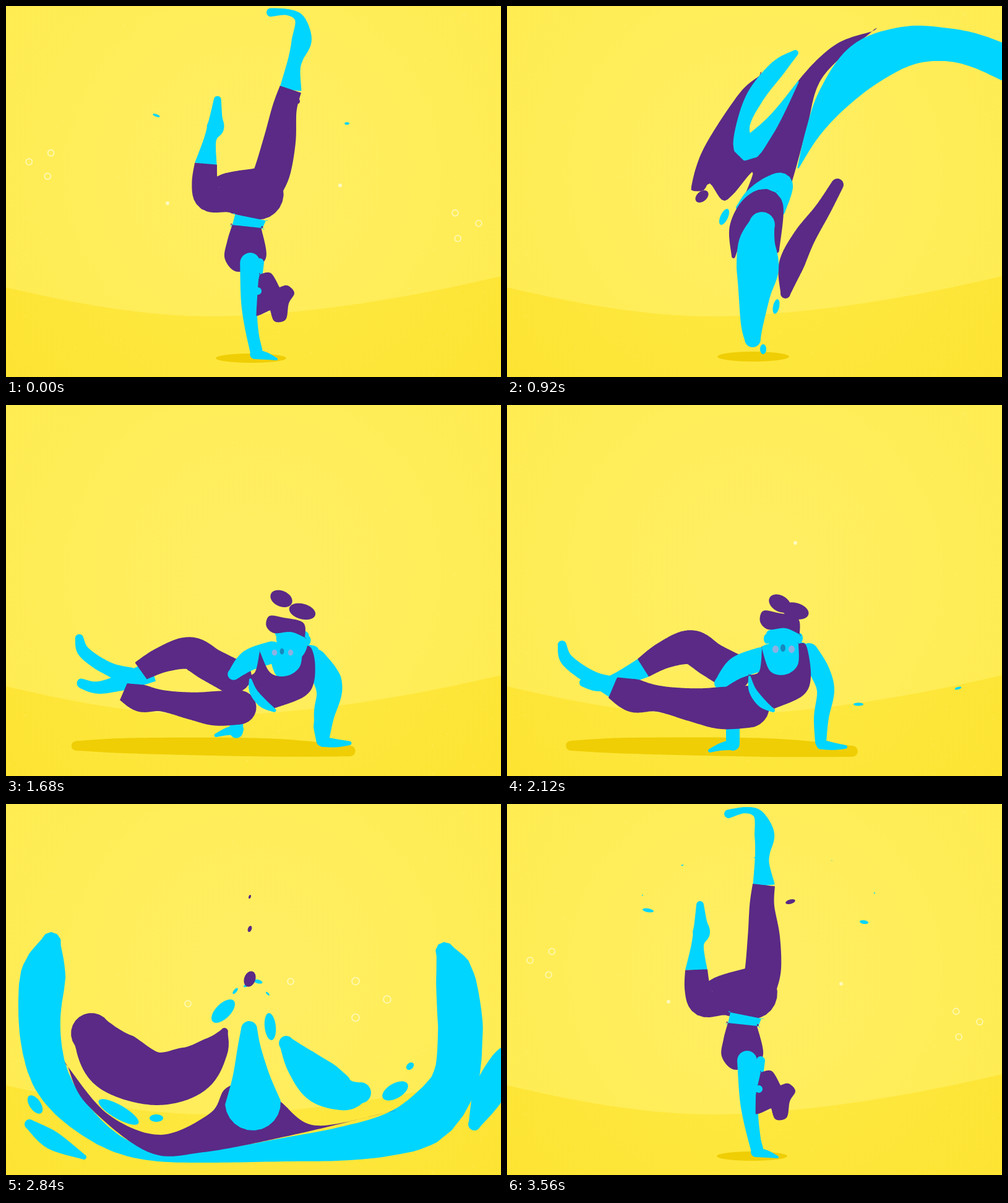
An HTML page with a canvas for the animation above (3.6 s loop, 800 by 600 pixels).

```html
<!DOCTYPE html>
<html lang="en">
<head>
<meta charset="utf-8">
<title>Liquid yoga</title>
<style>
html, body { margin: 0; width: 100%; height: 100%; overflow: hidden; background: #ffec58; }
canvas { display: block; }
</style>
</head>
<body>
<canvas id="stage" width="800" height="600"></canvas>
<script>
const ctx = document.getElementById('stage').getContext('2d');
const LOOP = 3600, STEP = 40, SAMPLES = 240, SPINE = 48;
const CYAN = '#00d5ff', PURPLE = '#5a2a86', WHITE = '#fffdf5', SHADOW = '#efce05', INK = '#32206c', BLUSH = '#8db0e2';
const lerp = (a, b, u) => a + (b - a) * u;
const mix = (p, q, u) => p.map((v, k) => lerp(v, q[k], u));
const rad = deg => deg * Math.PI / 180;
let seed = 7;
const random = () => (seed = seed * 16807 % 2147483647) / 2147483647;

// ---- geometry ----
// "!" after a point makes a corner
const parse = text => text.split(' ').flatMap(word => {
  const p = word.split(',').map(parseFloat);
  return word.endsWith('!') ? [p, p] : [p];
});

function spline(points, closed) {
  const n = points.length, out = [];
  const at = i => points[closed ? (i + n) % n : Math.max(0, Math.min(n - 1, i))];
  for (let i = 0; i < (closed ? n : n - 1); i++) {
    const [a, b, c, d] = [at(i - 1), at(i), at(i + 1), at(i + 2)];
    for (let t = 0; t < 0.95; t += 0.1)
      out.push(b.map((v, k) => v + t / 2 * (c[k] - a[k] + t * (2 * a[k] - 5 * v + 4 * c[k] - d[k]
        + t * (3 * (v - c[k]) + d[k] - a[k])))));
  }
  return closed ? out : [...out, at(n - 1)];
}

function resample(points, count, closed) {
  const path = closed ? [...points, points[0]] : points, run = [0];
  for (let i = 1; i < path.length; i++)
    run.push(run[i - 1] + Math.hypot(path[i][0] - path[i - 1][0], path[i][1] - path[i - 1][1]));
  const total = run[run.length - 1];
  let i = 1;
  return Array.from({ length: count }, (_, k) => {
    const goal = total * k / (closed ? count : count - 1);
    while (i < path.length - 1 && run[i] < goal) i++;
    return mix(path[i - 1], path[i], Math.min(1, (goal - run[i - 1]) / (run[i] - run[i - 1] || 1)));
  });
}

// Moves every spine point sideways by distance(point, index)
const offset = (spine, distance) => spine.map((p, i) => {
  const a = spine[Math.max(0, i - 1)], b = spine[Math.min(spine.length - 1, i + 1)];
  const len = Math.hypot(b[0] - a[0], b[1] - a[1]) || 1, d = distance(p, i) / len;
  return [p[0] - (b[1] - a[1]) * d, p[1] + (b[0] - a[0]) * d];
});

const signedArea = pts => pts.reduce((sum, p, i) => {
  const q = pts[(i + 1) % pts.length];
  return sum + (p[0] * q[1] - q[0] * p[1]) / 2;
}, 0);

// ---- pose building ----
let shapes, warp;
const still = p => p;

function add(ink, outline) {
  const pts = resample(outline.map(warp), SAMPLES, true);
  const area = signedArea(pts);
  if (area < 0) pts.reverse();
  const mid = [0, 1].map(k => pts.reduce((s, p) => s + p[k], 0) / SAMPLES);
  shapes.push({ ink, pts, mid, size: Math.sqrt(Math.abs(area)) });
}
const blob = (ink, text) => add(ink, spline(parse(text), true));

function ribbon(ink, width, path) {
  const spine = resample(path, SPINE, false);
  const half = (p, i) => width / 2 * Math.sin(Math.PI * i / (SPINE - 1)) ** 0.7;
  add(ink, [...offset(spine, half), ...offset(spine, (p, i) => -half(p, i)).reverse()]);
}
const shine = (width, text) => ribbon(WHITE, width, spline(parse(text), false));
const line = text => ribbon(INK, 1.6, spline(parse(text), false));

// Spine of "x,y,radius" with round ends ("|" keeps an end flat);
// side places a highlight across the limb, from -1 to 1
function limb(ink, text, side = 0, from = 0.15, to = 0.85, width = 5) {
  const spine = resample(spline(parse(text), false), SPINE, false);
  const left = offset(spine, p => p[2]), right = offset(spine, p => -p[2]).reverse();
  const cap = (center, start, flat) => {
    const angle = Math.atan2(start[1] - center[1], start[0] - center[0]);
    return flat ? [] : Array.from({ length: 11 }, (_, i) => {
      const a = angle - Math.PI * (i + 1) / 12;
      return [center[0] + center[2] * Math.cos(a), center[1] + center[2] * Math.sin(a)];
    });
  };
  const flatStart = text.split(' ')[0].endsWith('|'), flatEnd = text.endsWith('|');
  add(ink, [...left, ...cap(spine[SPINE - 1], left[SPINE - 1], flatEnd),
    ...right, ...cap(spine[0], right[SPINE - 1], flatStart)]);
  if (side) ribbon(WHITE, width, offset(spine, p => p[2] * side).slice(from * SPINE, to * SPINE));
}

function drop(ink, x, y, rx, ry = rx, deg = 0) {
  const c = Math.cos(rad(deg)), s = Math.sin(rad(deg));
  add(ink, Array.from({ length: 40 }, (_, i) => {
    const u = rx * Math.cos(i * Math.PI / 20), v = ry * Math.sin(i * Math.PI / 20);
    return [x + u * c - v * s, y + u * s + v * c];
  }));
}

// Drops flung along an elliptic arc, stretched in the direction of flight
function spray(ink, count, x, y, rx, ry, from, to, size) {
  for (let i = 0; i < count; i++) {
    const a = rad(lerp(from, to, (i + 0.5) / count)), reach = 0.86 + 0.2 * random();
    const long = size * (0.3 + random()), dx = -rx * Math.sin(a), dy = ry * Math.cos(a);
    drop(ink, x + rx * reach * Math.cos(a), y + ry * reach * Math.sin(a), long, long * 0.42, Math.atan2(dy, dx) * 180 / Math.PI);
  }
}

function pose(build) {
  shapes = [];
  warp = still;
  build();
  return shapes.map((s, i) => ({ ...s, z: i / shapes.length }));
}

// ---- poses ----
const handstand = (lean, extras = () => {}) => pose(() => {
  const shear = ([x, y]) => [x + lean * Math.max(0, 570 - y) * 0.04, y];
  const hinge = deg => {
    const c = Math.cos(rad(deg * lean)), s = Math.sin(rad(deg * lean));
    return ([x, y]) => [412 + 16 * lean + (x - 412) * c - (y - 270) * s, 270 + (x - 412) * s + (y - 270) * c];
  };
  drop(SHADOW, 396, 569.5, 57, 7.5);
  warp = hinge(12);
  limb(CYAN, '358,16,7 385,10,5 406,17,8 416,48,16 413,78,12 412,98,12 415,132,18|');
  limb(PURPLE, '415,131,18| 412,165,20 415,215,26 414,265,29 408,295,28');
  shine(9, '419,92 427,165 432,225 434,288');
  warp = hinge(7);
  limb(CYAN, '312,163,6 313,190,10 314,208,14 308,228,10 306,269,18|');
  limb(PURPLE, '306,268,18| 308,298,21 318,320,24 350,310,33 395,306,42');
  line('384,266 405,267 419,274');
  shine(5, '413,276 426,290 429,318');
  shine(5, '312,234 321,260 324,296');
  warp = shear;
  blob(CYAN, '361,337! 411,347! 406,360! 357,355!');
  blob(PURPLE, '357,354! 404,359! 414,405 395,424 365,429 347,408 350,380');
  shine(5, '400,361 405,385 408,411');
  warp = still;
  limb(CYAN, '410,415,7 407,455,5 402,500,4 407,556,5');
  blob(PURPLE, '410,434! 428,432 442,455! 455,452 466,464 457,481 452,507 434,510 427,492! 400,501 402,471');
  drop(CYAN, 407, 461, 6);
  shine(4, '415,433 430,440 438,455');
  shine(4, '449,460 459,458 459,469');
  warp = shear;
  limb(CYAN, '388,415,16 389,475,13 393,515,10 404,558,10', -0.6, 0, 0.75, 4);
  limb(CYAN, '402,563,8 420,566,6 437,571,2');
  line('404,470 403,505 408,553');
  line('418,560 427,564 437,569');
  warp = still;
  extras();
});

const melt = pose(() => {
  drop(SHADOW, 398, 567, 58, 8);
  blob(PURPLE, '298,292 318,230 375,142 408,113! 380,215 420,205 470,122 530,63 590,41! 510,115 484,200 458,292 440,330 372,335! 398,268 365,305 348,314 328,287 318,298 305,299');
  limb(CYAN, '470,263,1 494,205,12 528,148,26 580,93,37 645,65,32 705,62,27 760,73,27 830,103,29|', -0.6, 0.3, 0.9, 9);
  limb(CYAN, '466,76,5 438,100,13 402,145,14 381,195,11 387,231,20 415,205,14 440,172,8 471,122,1');
  shine(5, '419,132 385,180 383,222');
  limb(CYAN, '374,326,4 395,306,10 425,288,13 446,289,16 440,330,10');
  limb(PURPLE, '534,289,10 510,330,13 480,375,18 459,420,20 450,465,8', 0.5, 0.05, 0.55, 4);
  limb(PURPLE, '366,405,3 373,360,14 400,330,25 425,325,22 435,395,5');
  limb(CYAN, '412,354,21 404,385,30 405,425,34 400,465,26 396,515,18 397,539,13', -0.4, 0.15, 0.9, 6);
  shine(6, '468,236 440,290 429,347');
  drop(PURPLE, 315, 308, 12, 8, -40);
  drop(CYAN, 351, 341, 14, 6, -65);
  drop(CYAN, 435, 486, 12, 5, -78);
  drop(CYAN, 414, 555, 5, 8);
});

const splash = pose(() => {
  limb(SHADOW, '296,554,3 420,551,10 522,552,3');
  limb(CYAN, '71,395,11 115,438,24 180,462,24 260,475,24 330,498,25 400,500,22 466,493,17', -0.2, 0.82, 1, 4);
  blob(PURPLE, '172,436! 250,455 345,457 362,460 380,472 428,476! 330,498 250,472');
  limb(PURPLE, '292,400,3 350,415,8 420,424,16 510,425,17 600,407,26 668,384,19', 0.3, 0.72, 1, 6);
  limb(CYAN, '526,549,6 506,543,8 514,521,10 600,517,8 700,489,11 830,440,9');
  limb(CYAN, '745,468,3 780,440,10 830,385,16');
  limb(CYAN, '580,477,5 640,464,13 706,437,6');
  drop(CYAN, 470, 454, 35, 7, 4);
  drop(CYAN, 735, 344, 18, 10, -40);
  drop(CYAN, 768, 358, 42, 14, -52);
  drop(CYAN, 793, 80, 17, 8, 50);
  drop(CYAN, 781, 115, 13, 7, 25);
  drop(PURPLE, 516, 31, 21, 8, -20);
  drop(PURPLE, 708, 214, 20, 9, 38);
  drop(PURPLE, 647, 353, 22, 4, -6);
  spray(CYAN, 8, 600, 250, 130, 190, 205, 300, 11);
  spray(CYAN, 4, 600, 380, 130, 110, 0, 120, 8);
});

const plank = (dip, extras = () => {}) => pose(() => {
  limb(SHADOW, '103,551,8 200,551,13 420,554,15 558,560,9');
  warp = ([x, y]) => [x, y + dip * Math.max(0, 545 - y) * 0.06];
  limb(CYAN, '365,520,11 365,548,11');
  limb(CYAN, '365,549,9 345,553,6 328,559,3');
  limb(CYAN, '222,424,17| 180,444,12 148,454,9 124,449,7');
  limb(PURPLE, '220,425,17| 255,404,22 297,392,28 330,412,28 365,432,30', -0.5, 0.5, 0.98, 7);
  limb(CYAN, '89,388,7 95,410,10 118,430,11 145,445,12 174,457,18|');
  limb(CYAN, '488,400,15 505,430,16 515,462,14 508,505,12 507,545,9', -0.5, 0, 0.2, 6);
  limb(CYAN, '508,549,8 528,552,6 547,553,3');
  limb(CYAN, '345,450,10 372,425,18 410,411,19');
  blob(CYAN, '410,393 448,384 485,388 478,425 450,440 420,432');
  limb(PURPLE, '171,457,18| 205,470,27 245,475,21 300,485,27 345,490,34 390,488,34');
  blob(PURPLE, '412,394! 425,430 450,436 470,420 471,386! 484,390 491,440 478,470 432,491! 405,475 392,437! 408,430');
  limb(CYAN, '392,440,2 397,462,6 412,482,7 430,494,3');
  drop(CYAN, 420, 378, 5, 8);
  drop(CYAN, 473, 377, 5, 8);
  blob(CYAN, '422,365 468,362 470,385 463,402 448,413 432,408 424,390');
  blob(PURPLE, '409,350 414,333 437,336 470,345 473,371! 450,361 422,363');
  drop(PURPLE, 441, 321, 19, 13, 30);
  drop(PURPLE, 466, 333, 22, 13, 15);
  for (const side of [-1, 1]) {
    const x = 446 + side * 13;
    drop(BLUSH, x + 1, 395, 5, 6);
    line(`${x - 5},383 ${x},386 ${x + 5},384`);
    line(`${x - 5},375 ${x},372 ${x + 5},374`);
  }
  drop('#1688bd', 446, 393, 4, 6);
  line('440,403 447,406 454,403');
  line('424,390 432,408 448,413 464,402');
  line('396,440 403,435 399,430');
  line('240,458 255,464 250,471');
  for (let i = 0; i < 3; i++) {
    line(`${84 + i},${385 + i * 6} ${91 + i},${387 + i * 6}`);
    line(`${120 + i * 6},${445 + i * 5} ${128 + i * 5},${445 + i * 5}`);
    line(`${330 + i * 8},${558 - i} ${342 + i * 7},${550 - i}`);
    line(`${522 + i * 5},${548 - i} ${532 + i * 6},${555 - i}`);
  }
  shine(6, '135,432 180,445 235,459');
  shine(4, '433,312 450,314 456,321');
  shine(3, '462,321 476,325 484,336');
  shine(6, '468,347 472,357 471,369');
  shine(4, '480,431 488,440 487,453');
  warp = still;
  extras();
});

const wave = pose(() => {
  limb(CYAN, '73,223,16 61,270,36 54,340,34 59,400,32 75,450,30 110,497,24 170,545,15 235,568,9 320,571,9 460,558,20 540,550,27 620,535,34 680,508,42 725,450,37 734,380,36 733,340,36 724,270,30 709,238,15');
  blob(PURPLE, '100,425! 165,502 250,535 330,500 355,460 400,450 442,480 500,520 615,499! 460,536 320,563 230,563 130,485');
  limb(CYAN, '393,364,13 393,395,19 396,440,30 399,483,45', -0.55, 0, 1, 6);
  limb(PURPLE, '138,371,33 175,415,50 240,444,43 300,430,40 338,395,23 353,368,6', -0.6, 0, 0.6);
  limb(CYAN, '453,387,12 477,418,26 510,450,35 548,469,27 573,467,17', -0.5, 0.1, 1);
  limb(CYAN, '38,518,8 75,544,15 126,571,4', -0.3, 0.1, 0.8, 3);
  limb(CYAN, '757,518,10 780,468,25 803,418,20 830,400,20', 0.5, 0.2, 0.7, 4);
  shine(6, '68,226 85,245 83,310 78,355 88,416');
  shine(8, '706,240 730,250 760,340 755,430 718,515');
  drop(CYAN, 47, 486, 17, 9, 55);
  drop(CYAN, 182, 498, 37, 11, 30);
  drop(CYAN, 243, 508, 11, 6);
  drop(CYAN, 351, 335, 24, 12, -45);
  drop(CYAN, 427, 360, 22, 9, 84);
  drop(CYAN, 629, 464, 23, 12, -30);
  drop(CYAN, 653, 424, 7, 5, -45);
  spray(CYAN, 4, 400, 380, 50, 90, 225, 310, 6);
  for (let i = 0; i < 3; i++) drop(PURPLE, 394, 283 - 81 * i + 29 * (i >> 1), 13 / (1 + 1.5 * i), 9 / (1 + 2 * i), -70);
});

const burst = pose(() => {
  blob(CYAN, '172,152 225,110 320,99 405,104 440,100 470,125 428,167 440,201 382,250 300,238 218,206 233,168 213,146');
  limb(CYAN, '420,140,36 490,88,25 545,78,32 610,103,18 665,128,17 705,165,15 732,203,4', -0.55, 0.58, 0.95, 6);
  limb(CYAN, '555,62,18 625,58,12 682,77,7', -0.4, 0.25, 0.95, 4);
  limb(CYAN, '420,188,21 470,178,17 530,179,17 580,191,19 604,208,7', -0.5, 0.5, 0.98, 4);
  limb(PURPLE, '256,283,19 300,266,32 350,255,27 362,248,19', 0.6, 0.4, 1, 6);
  limb(PURPLE, '165,217,7 205,202,9 246,190,7', -0.3, 0.1, 0.5, 4);
  limb(PURPLE, '605,172,6 640,203,15 677,248,4', -0.3, 0.15, 0.8, 4);
  limb(CYAN, '154,62,4 205,38,11 276,27,3', -0.4, 0.4, 0.9, 3);
  limb(CYAN, '248,44,4 300,48,10 340,58,4', -0.3, 0.5, 1, 3);
  limb(CYAN, '54,372,6 52,315,15 66,250,7', 0.5, 0.4, 0.95, 4);
  limb(CYAN, '713,346,7 715,405,15 684,480,6', -0.5, 0.1, 0.65);
  limb(CYAN, '750,253,4 760,282,11 769,312,4', -0.3, 0.2, 0.9, 3);
  shine(6, '212,124 270,111 330,110 390,117 420,101');
  drop(CYAN, 397, 58, 9, 10);
  drop(CYAN, 140, 145, 25, 13, -42);
  drop(CYAN, 84, 116, 29, 11, -48);
  drop(CYAN, 48, 195, 23, 10, -60);
  drop(CYAN, 118, 207, 16, 9, -50);
  drop(CYAN, 118, 279, 17, 7, -65);
  drop(CYAN, 214, 308, 19, 10, -45);
  drop(CYAN, 692, 103, 16, 9, 32);
  drop(CYAN, 629, 243, 19, 8, 50);
  drop(CYAN, 721, 237, 22, 7, 65);
  drop(CYAN, 740, 372, 19, 5, 85);
  drop(CYAN, 182, 532, 14, 7, 25);
  drop(CYAN, 602, 517, 10, 4);
  spray(CYAN, 5, 400, 300, 340, 260, 150, 230, 6);
});

const arriving = handstand(0, () => {
  drop(CYAN, 228, 172, 9, 3, 10);
  drop(CYAN, 577, 191, 7, 3, 8);
  drop(PURPLE, 458, 158, 8, 3.5, -15);
  spray(CYAN, 5, 400, 200, 240, 120, 195, 345, 2.5);
});
const landed = handstand(1, () => {
  drop(CYAN, 243, 177, 6, 2, 20);
  drop(CYAN, 551, 190, 4, 2);
  drop(PURPLE, 472, 154, 3, 4);
});
const settled = plank(0, () => {
  drop(CYAN, 568, 484, 8, 2.5);
  drop(CYAN, 729, 458, 5.5, 2, -15);
});

// ---- timeline: time, pose, easing towards the next pose ----
const linear = u => u, easeIn = u => u * u, easeOut = u => 1 - (1 - u) ** 2, smooth = u => u * u * (3 - 2 * u);
const keys = [
  [0, landed, easeOut], [240, handstand(1.5), smooth], [600, handstand(1.2), easeIn], [760, handstand(2.1), easeIn],
  [920, melt, linear], [1280, splash, easeOut], [1800, plank(0.6), easeOut], [2120, settled, smooth],
  [2400, plank(0), smooth], [2640, plank(1), easeIn], [2840, wave, linear], [3040, burst, easeOut],
  [3400, handstand(-1.2), smooth], [3560, arriving, linear], [LOOP, landed, linear]
];

function align(from, to) {
  let best = 0, least = Infinity;
  for (let shift = 0; shift < SAMPLES; shift += 3) {
    let cost = 0;
    for (let i = 0; i < SAMPLES; i += 8) {
      const p = from[i], q = to[(i + shift) % SAMPLES];
      cost += (p[0] - q[0]) ** 2 + (p[1] - q[1]) ** 2;
    }
    if (cost < least) { least = cost; best = shift; }
  }
  return [...to.slice(best), ...to.slice(0, best)];
}

// Pair shapes of one colour, big ones first; leftovers shrink or grow in place
function pairUp(from, to) {
  const free = new Set(to);
  const collapse = s => ({ ...s, pts: s.pts.map(() => s.mid) });
  const pairs = [...from].sort((a, b) => b.size - a.size).map(a => {
    let match = null, least = a.ink === INK ? 50 : Infinity;
    for (const b of free) {
      const cost = Math.hypot(a.mid[0] - b.mid[0], a.mid[1] - b.mid[1]) + 2 * Math.abs(a.size - b.size);
      if (a.ink === b.ink && cost < least) { least = cost; match = b; }
    }
    if (!match) return { a, b: collapse(a), pace: u => 1 - (1 - u) ** 3 };
    free.delete(match);
    return { a, b: { ...match, pts: align(a.pts, match.pts) }, pace: linear };
  });
  for (const b of free) pairs.push({ a: collapse(b), b, pace: u => u ** 3 });
  return pairs;
}
const spans = keys.slice(0, -1).map(([start, shape, ease], i) =>
  ({ start, end: keys[i + 1][0], ease, pairs: pairUp(shape, keys[i + 1][1]) }));

// ---- backdrop and bubbles ----
function glow(inner, outer) {
  const g = ctx.createRadialGradient(400, 270, 60, 400, 270, 520);
  g.addColorStop(0, inner);
  g.addColorStop(1, outer);
  return g;
}
const sky = glow('#ffee62', '#ffec50'), ground = glow('#ffea45', '#fde433');
const specks = Array.from({ length: 420 }, () => [random() * 800, random() * 600, 0.6 + random()]);

function drawBackdrop() {
  ctx.fillStyle = sky;
  ctx.fillRect(0, 0, 800, 600);
  ctx.fillStyle = ground;
  ctx.beginPath();
  ctx.moveTo(0, 455);
  ctx.bezierCurveTo(120, 483, 230, 503, 345, 502);
  ctx.bezierCurveTo(500, 498, 660, 470, 800, 437);
  ctx.lineTo(800, 600);
  ctx.lineTo(0, 600);
  ctx.fill();
  ctx.fillStyle = 'rgba(255,250,150,.4)';
  for (const [x, y, r] of specks) ctx.fillRect(x, y, r, r);
}

const bubbles = [];
const bubble = (time, fade, x, y, r) => bubbles.push({ time, fade, x, y, r });
const trio = (time, fade, x, y, spread, turn, r = 5) => {
  for (const a of [turn, turn + 120, turn + 240])
    bubble(time, fade, x + spread * Math.cos(rad(a)), y + spread * Math.sin(rad(a)), r);
};
trio(0, 650, 59, 255, 22, -52);
trio(0, 650, 740, 354, 24, -6);
bubble(0, 650, 261, 319, 3);
bubble(0, 650, 540, 290, 3);
trio(1280, 350, 682, 142, 21, -75);
bubble(1280, 350, 413, 275, 4);
bubble(1280, 350, 434, 212, 3);
bubble(2120, 350, 466, 223, 3);
trio(2840, 190, 582, 316, 34, 0, 6);
bubble(2840, 190, 460, 287, 5);
bubble(2840, 190, 294, 323, 5);
trio(3040, 190, 773, 97, 21, 10, 6);
bubble(3040, 190, 467, 321, 5);

function drawBubbles(t) {
  ctx.fillStyle = ctx.strokeStyle = '#fffde0';
  ctx.lineWidth = 1.6;
  for (const { time, fade, x, y, r } of bubbles) {
    const d = (t - time + LOOP * 1.5) % LOOP - LOOP / 2;
    ctx.globalAlpha = 0.75 * Math.max(0, 1 - Math.abs(d) / fade);
    ctx.beginPath();
    ctx.arc(x, y - d * 0.02, r, 0, 7);
    if (r > 3) ctx.stroke(); else ctx.fill();
  }
  ctx.globalAlpha = 1;
}

function drawFigure(t) {
  const span = spans.find(s => t < s.end);
  const u = span.ease((t - span.start) / (span.end - span.start));
  const depth = ({ a, b }) => lerp(a.z, b.z, u);
  for (const { a, b, pace } of [...span.pairs].sort((p, q) => depth(p) - depth(q))) {
    ctx.fillStyle = a.ink;
    ctx.beginPath();
    a.pts.forEach((p, i) => ctx.lineTo(...mix(p, b.pts[i], pace(u))));
    ctx.fill();
  }
}

const began = performance.now();
function frame() {
  const t = Math.floor((performance.now() - began) % LOOP / STEP) * STEP;
  drawBackdrop();
  drawBubbles(t);
  drawFigure(t);
  requestAnimationFrame(frame);
}
frame();
</script>
</body>
</html>
```
